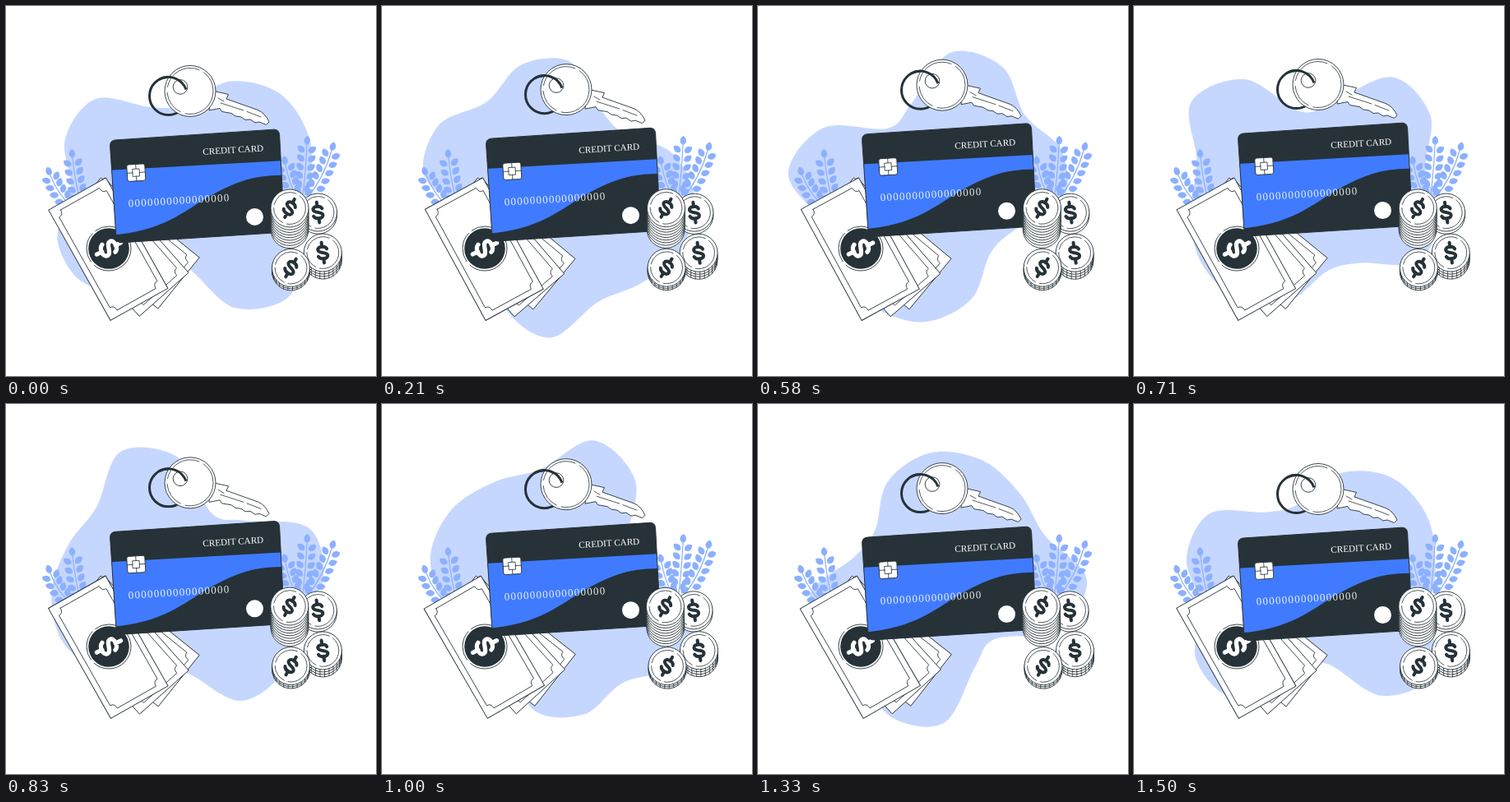
An HTML page for the animation above (1.54 s loop, 450 by 450 pixels).

```html
<!DOCTYPE html>
<html lang="en">
<head>
<meta charset="utf-8">
<title>Credit card</title>
<style>
  html, body { margin: 0; width: 100%; height: 100%; overflow: hidden; background: #fff; }
  svg { display: block; width: 100vw; height: 100vh; }
  .line { fill: #fff; stroke: #263238; stroke-width: .9; stroke-linejoin: round; }
  .thin { fill: none; stroke: #263238; stroke-width: .8; stroke-linecap: round; }
  .ring { fill: none; stroke: #263238; stroke-width: 3; }
  .leaf { fill: #8cb0ff; }
  .stem { fill: none; stroke: #8cb0ff; stroke-width: 1.2; }
  .dollar { fill: none; stroke-width: 4; stroke-linecap: round; }
  text { fill: #fff; font-family: "Liberation Serif", "Times New Roman", serif; }
</style>
</head>
<body>
<svg viewBox="0 0 450 450">
  <path id="blob" fill="#c6d7ff"/>
  <g id="plants"></g>
  <g id="money"></g>
  <g id="card">
    <clipPath id="face">
      <path id="shape" d="M133 163L326 150.2Q331.8 150 332.6 156.5L338.5 269Q338.5 275 332.5 275.6L141 287.8Q134.6 288 134 282L126.6 170Q126.6 163.6 133 163Z"/>
    </clipPath>
    <use href="#shape" fill="#263238"/>
    <path clip-path="url(#face)" fill="#407bff" d="M120 200.2L345 187.6V206C300 204 276 216 248 231C215 250 190 276 120 279Z"/>
    <use href="#shape" fill="none" stroke="#263238"/>
    <text transform="translate(239.5 181) rotate(-3.5)" font-size="11.2">CREDIT CARD</text>
    <text transform="translate(149 244.6) rotate(-3.5)" font-size="13" letter-spacing="1.25" opacity=".88">0000000000000000</text>
    <g transform="translate(158.3 202.7) rotate(-3.5)">
      <rect class="line" x="-11" y="-10.2" width="22" height="20.4" rx="2.5"/>
      <path class="thin" d="M-4-4.5H4V4.5H-4ZM-11 0H-4M4 0H11M0-4.5V-10M0 4.5V10"/>
    </g>
    <circle cx="302.5" cy="256.5" r="10.5" fill="#fff"/>
  </g>
  <g id="key">
    <circle class="ring" cx="197.5" cy="109.5" r="23"/>
    <path class="line" d="M250 103L270.5 107.5L268 113L306 126.5Q315 130 320 141L316.5 144.5L308 141L303 142L297 138L291 138.5L286 135L279 134L274 130.5L262.5 128.5L260 124.5L247 127Z"/>
    <path class="thin" d="M258 112L265 116M261 118L289 127M293 128.5L310 135"/>
    <circle class="line" cx="224" cy="103.5" r="31"/>
    <circle class="thin" cx="224" cy="103.5" r="28" stroke-dasharray="50 6 30 7"/>
    <circle class="line" cx="212" cy="98.5" r="8.8"/>
    <path class="ring" d="M186 89.5A23 23 0 0 1 219 101.5"/>
  </g>
  <g id="coins"></g>
</svg>
<script>
const $ = id => document.getElementById(id);
const LOOP = 1540, STEPS = 37, CX = 218, CY = 222;
const rad = deg => deg * Math.PI / 180;
const polar = (r, deg) => [r * Math.cos(rad(deg)), r * Math.sin(rad(deg))];

// Smooth closed curve through radii at equal angles
function lobes(radii) {
  const n = radii.length, p = radii.map((r, i) => polar(r, i * 360 / n));
  const at = i => p[(i + n) % n];
  const handle = (from, a, b) => from.map((v, k) => v + (b[k] - a[k]) / 6);
  return 'M' + p[0] + p.map((q, i) =>
    `C${handle(q, at(i - 1), at(i + 1))} ${handle(at(i + 1), at(i + 2), q)} ${at(i + 1)}`).join('') + 'Z';
}

$('blob').setAttribute('d', lobes(
  [151, 145, 182, 157, 95, 108, 166, 168, 139, 158, 154, 107, 102, 141, 163, 163]));

function leaf(x, y, angle, gap) {
  const [dx, dy] = polar(gap, angle);
  return `<path class="leaf" transform="translate(${x + dx} ${y + dy}) rotate(${angle})" d="M0 0C2-5 8-5 11 0C8 5 2 5 0 0Z"/>`;
}

// Bowed stem from tip to root with evenly spaced pairs of leaves
function plant(x0, y0, x2, y2) {
  const x1 = x0 + .3 * (x2 - x0), y1 = (y0 + y2) / 2 + 3;
  const pairs = Math.round(Math.hypot(x2 - x0, y2 - y0) / 11.5);
  let s = `<path class="stem" d="M${x0} ${y0}Q${x1} ${y1} ${x2} ${y2}"/>`;
  for (let i = 0; i <= pairs; i++) {
    const t = i / (pairs + .6), u = 1 - t;
    const x = u * u * x0 + 2 * u * t * x1 + t * t * x2;
    const y = u * u * y0 + 2 * u * t * y1 + t * t * y2;
    const a = Math.atan2(u * (y0 - y1) + t * (y1 - y2), u * (x0 - x1) + t * (x1 - x2)) * 180 / Math.PI;
    s += i ? leaf(x, y, a - 50, 3.5) + leaf(x, y, a + 50, 3.5) : leaf(x, y, a, 0);
  }
  return s;
}

$('plants').innerHTML =
  plant(54, 206, 85, 249) + plant(81, 185, 92, 243) +
  plant(366, 169, 360, 237) + plant(396, 176, 364, 237) + plant(340, 193, 354, 233);

const dollar = (angle, size, color) =>
  `<path class="dollar" stroke="${color}" transform="rotate(${angle}) scale(${size})"
    d="M5.5-4C4-8.5-5.5-8.5-5.5-4C-5.5 1 5.5-1 5.5 4C5.5 8.5-4 8.5-6 4M0-7V-12.5M0 7V12.5"/>`;

const bill = (x, angle) => `<g transform="translate(${x} 209) rotate(${angle})">
  <rect class="line" x="-80" width="80" height="154"/>
  <path class="thin" d="M-67 7H-13Q-13 14-7 14V140Q-13 140-13 147H-67Q-67 140-73 140V14Q-67 14-67 7Z"/></g>`;

$('money').innerHTML = bill(115.5, -51) + bill(120, -41.5) + bill(121.5, -29.3) +
  `<g transform="translate(125 295)">
    <circle r="27" class="line" stroke-dasharray="62 5 38 4"/>
    <circle r="24.8" fill="#263238"/>${dollar(64, 1.3, '#fff')}</g>`;

// Pile of coins; ribs mark the milled edge
function pile(x, y, rows, gap, tilt, ribbed) {
  const r = 23;
  let s = '';
  for (let i = rows; i >= 0; i--) s += `<circle class="line" cy="${i * gap}" r="${r}"/>`;
  if (ribbed) for (let a = 15; a < 170; a += 14)
    s += `<path class="thin" d="M${polar(r, a)}v${rows * gap}"/>`;
  return `<g transform="translate(${x} ${y})">${s}
    <circle class="thin" r="${r - 3.6}" stroke-dasharray="34 5 22 4"/>${dollar(tilt, 1, '#263238')}</g>`;
}

$('coins').innerHTML =
  pile(379.5, 251, 1, 3.2, -8) + pile(385.3, 300, 3, 3, -8, true) +
  pile(345, 246, 8, 3.2, 28) + pile(346.5, 318.5, 2, 2.2, 30, true);

const set = (id, v) => $(id).setAttribute('transform', v);

function draw(now) {
  const t = Math.floor(now % LOOP / 10) * 10;
  const step = Math.min(STEPS - 1, Math.floor((t + 4.9) * .024));
  const turn = step / STEPS * 360, phase = rad(turn);
  const lift = -4 * (1 - Math.cos(phase + .16));
  const lead = 2.5 * (1 - Math.cos(phase));
  const sway = Math.sin(phase);
  set('blob', `translate(${CX} ${CY}) rotate(${turn + lead})`);
  set('card', `translate(0 ${lift})`);
  set('key', `translate(0 ${lift})`);
  set('money', `rotate(${sway} 124 295)`);
  set('coins', `rotate(${sway} 366 285)`);
}

const start = performance.now();
function tick() {
  draw(performance.now() - start);
  requestAnimationFrame(tick);
}
tick();
</script>
</body>
</html>
```
